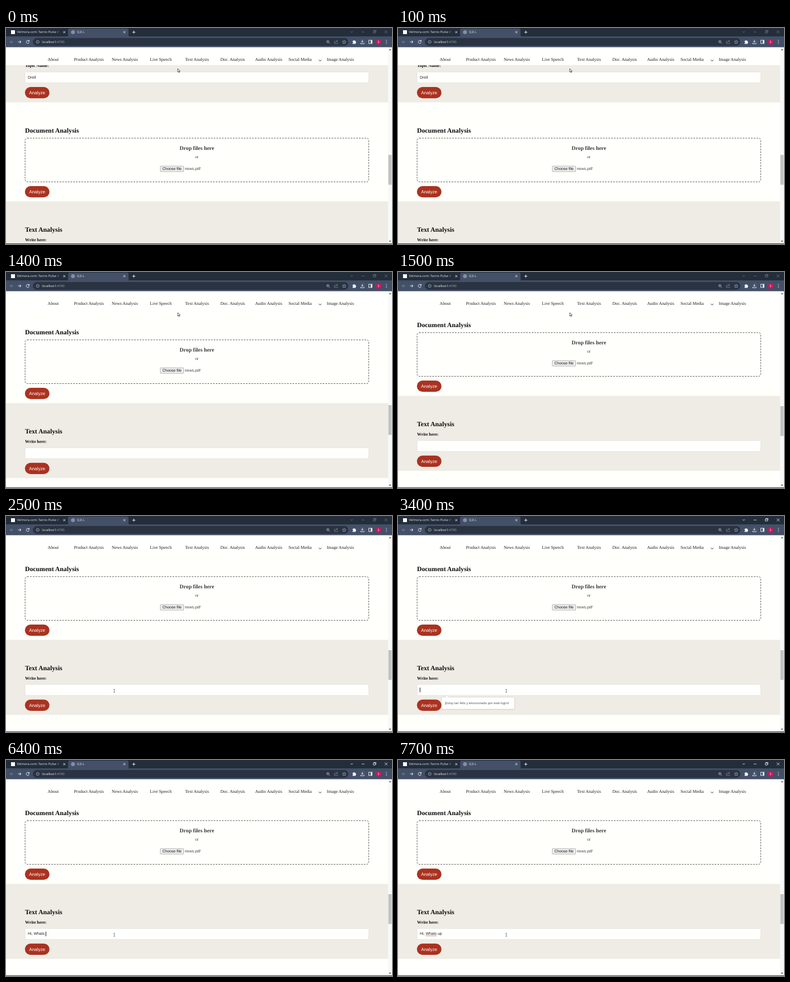
Animation, 690 px wide and 388 px high, one loop 8000 ms. Source, as an HTML page:

```html
<!DOCTYPE html>
<html lang="en">
<head>
<meta charset="utf-8">
<title>Text analysis demo</title>
<style>
  html, body { margin: 0; width: 100%; height: 100%; overflow: hidden; background: #fffffb; }
  svg { display: block; width: 690px; height: 388px; }
  text { white-space: pre; text-rendering: geometricPrecision; }
  .serif { font-family: "Liberation Serif", "Times New Roman", serif; }
  .sans { font-family: "Liberation Sans", Arial, sans-serif; }
  .ui { font-family: "Open Sans", sans-serif; }
  .line { fill: none; stroke: #e4e8ee; stroke-width: 1; }
  .thin { fill: none; stroke: #b4bcc8; stroke-width: .7; }
</style>
</head>
<body>
<svg viewBox="0 0 690 388" xmlns="http://www.w3.org/2000/svg">
  <defs>
    <clipPath id="view"><rect y="66.5" width="683" height="321"/></clipPath>
    <linearGradient id="tabFade" x1="0" x2="1">
      <stop offset="0" stop-color="#242d3a" stop-opacity="0"/>
      <stop offset="1" stop-color="#242d3a"/>
    </linearGradient>
    <filter id="shadow" x="-10%" y="-30%" width="120%" height="170%">
      <feDropShadow dx="0" dy=".5" stdDeviation="1.1" flood-opacity=".22"/>
    </filter>
  </defs>

  <rect width="690" height="388" fill="#fffffb"/>
  <g clip-path="url(#view)"><g id="page"></g></g>
  <g id="nav"><rect y="34" width="683" height="32.5" fill="#fffffd"/></g>
  <path d="M559.3 57.2l2.2 2.1 2.2-2.1" fill="none" stroke="#222" stroke-width="1"/>

  <g id="scrollbar">
    <rect x="683" y="34" width="7" height="354" fill="#f8f8f7"/>
    <path d="M684.5 40h4l-2-2.6zM684.5 382h4l-2 2.6z" fill="#555"/>
    <rect id="thumb" x="683.5" width="5.8" height="53.5" fill="#c1c1c0"/>
  </g>
  <rect y="387" width="690" height="1" fill="#34373c"/>

  <g id="browser">
    <rect width="690" height="16" fill="#242d3a"/>
    <rect y="15" width="690" height="19.5" fill="#435067"/>
    <path d="M108 15.5q3 0 3-3V4q0-3 3-3h102q3 0 3 3v8.5q0 3 3 3z" fill="#435067"/>
    <rect x="48" y="18" width="564" height="14" rx="7" fill="#2a3341"/>
    <rect x="9" y="4" width="7" height="7" fill="#fff"/>
    <circle cx="119.7" cy="7.5" r="3.5" fill="#8290a5"/>
    <text class="ui" x="19.5" y="9.4" font-size="5.75" fill="#e6e9ee">Velmora.com: Tarnix Pulse 4 Fit</text>
    <rect x="88" y="2" width="9" height="12" fill="url(#tabFade)"/>
    <rect x="97" y="2" width="11" height="12" fill="#242d3a"/>
    <text class="ui" x="127" y="9.4" font-size="5.6" fill="#f0f3f6">Q.E.L</text>
    <text class="ui" x="64.3" y="27.1" font-size="5.75" fill="#f1f3f5">localbox1<tspan fill="#a4adba">:4700</tspan></text>
    <path class="line" d="M102.4 5.7l3.6 3.6m0-3.6l-3.6 3.6M209.8 5.7l3.6 3.6m0-3.6l-3.6 3.6M225.7 7.5h5.6m-2.8-2.8v5.6"/>
    <path class="line" d="M13 25H7.5m2.6-2.6L7.5 25l2.6 2.6" style="stroke:#7b8799"/>
    <path class="line" d="M21.5 25H27m-2.6-2.6L27 25l-2.6 2.6"/>
    <path class="line" d="M41 23.3a2.7 2.7 0 1 0 .5 2.4M41.5 21.8v2.3h-2.3"/>
    <g class="thin">
      <circle cx="56.7" cy="25" r="2.6"/><path d="M56.7 24.5v2m0-3.2v.6"/>
      <circle cx="575.3" cy="24.5" r="2.2"/><path d="M577 26.2l2.2 2.2M574.2 24.5h2.2m-1.1-1.1v2.2"/>
      <path d="M588.5 23.5h-1.3v4.5h5.8v-1.5M589 26q.2-2.6 3.3-2.8m-1.3-1.6l1.9 1.6-1.9 1.7" stroke="#8a94a4"/>
      <path d="M604.5 21.9l.9 2.1 2.3.2-1.8 1.5.6 2.3-2-1.2-2 1.2.6-2.3-1.8-1.5 2.3-.2z"/>
    </g>
    <path class="line" d="M637 21.5v4.2m-2-1.9l2 2 2-2m-5.2 3v1.4h6.4v-1.4"/>
    <rect class="line" x="648.5" y="22" width="5.8" height="5.8"/>
    <path d="M619.5 23h1.6a1.1 1.1 0 0 1 2.2 0h1.7v1.7a1.1 1.1 0 0 1 0 2.2v1.6h-5.5v-1.8a1 1 0 0 0 0-2zM652 22h2.3v5.8H652z" fill="#eef1f5"/>
    <circle cx="666" cy="25" r="5" fill="#c9185b"/>
    <text class="ui" x="666" y="27" font-size="5.5" fill="#fff" text-anchor="middle">S</text>
    <path d="M680 22.2v.01m0 2.8v.01m0 2.8v.01" stroke="#eef1f5" stroke-width="1.4" stroke-linecap="round"/>
    <g id="controls" fill="none" stroke-width=".8">
      <path d="M615.8 6l2.2 2.1L620.2 6M635.8 7.2h5M677 4.5l5 5m0-5l-5 5"/>
      <path d="M656.5 5.5h3.6v3.6h-3.6zM657.7 5.3v-1h3.6v3.6h-1"/>
    </g>
  </g>

  <g id="popup">
    <path d="M80 326h4l3.5-3 3.5 3h115q2 0 2 2v16.5q0 2-2 2H80q-2 0-2-2V328q0-2 2-2z" fill="#fffffe" filter="url(#shadow)"/>
    <text class="ui" x="83.5" y="338.2" font-size="5.6" fill="#3c4047">¡Estoy tan feliz y emocionado por este logro!</text>
  </g>
  <path id="arrow" d="M0 0v6.2l1.4-1.3 1 2.2 1-.5-1-2.1h2z" fill="#fff" stroke="#222" stroke-width=".7"/>
  <path id="ibeam" d="M-1.4-2.7h2.8M0-2.7v5.4M-1.4 2.7h2.8" transform="translate(193.5 314)" fill="none" stroke="#444" stroke-width=".6"/>
</svg>

<script>
const LOOP = 8000, SCROLL_END = 89;
const $ = id => document.getElementById(id);

function add(parent, tag, attrs, content = '') {
  const node = document.createElementNS('http://www.w3.org/2000/svg', tag);
  for (const key in attrs) node.setAttribute(key, attrs[key]);
  node.textContent = content;
  parent.append(node);
  return node;
}

function label(parent, content, x, y, size, attrs = {}) {
  return add(parent, 'text', { class: 'serif', x, y, 'font-size': size, fill: '#0c0c0c', ...attrs }, content);
}

const page = $('page');
const bold = { 'font-weight': 'bold' };
const sans = { class: 'sans', fill: '#222' };

function band(y, height) {
  add(page, 'rect', { y, width: 683, height, fill: '#efebe5' });
}

function button(y) {
  add(page, 'rect', { x: 33.8, y, width: 43.9, height: 20.2, rx: 10.1, fill: '#aa3220' });
  label(page, 'Analyze', 55.6, y + 12.8, 8.15, { class: 'sans', fill: '#fff', 'text-anchor': 'middle' });
}

// A captioned input with its button; returns the input's text node.
function field(caption, y, value) {
  label(page, caption, 34, y - 8.6, 7.83, bold);
  add(page, 'rect', { x: 34, y, width: 614.5, height: 19.5, rx: 1, fill: '#fffffd', stroke: '#dcdad5', 'stroke-width': .6 });
  button(y + 27);
  return label(page, value, 39, y + 11.7, 6.95, sans);
}

band(0, 133.5);
field('Topic Name:', 79, 'Drell');

label(page, 'Document Analysis', 34, 187.8, 11.75, bold);
add(page, 'rect', { x: 34.1, y: 197.9, width: 614.3, height: 78.5, rx: 4, fill: 'none', stroke: '#555', 'stroke-width': .98, 'stroke-dasharray': '2.94 1.96' });
label(page, 'Drop files here', 341.2, 219.4, 9.85, { ...bold, fill: '#3c3c3c', 'text-anchor': 'middle' });
label(page, 'or', 341.2, 233.9, 7.83, { fill: '#444', 'text-anchor': 'middle' });
add(page, 'rect', { x: 275.9, y: 248.1, width: 41.6, height: 9.9, rx: 1, fill: '#efefef', stroke: '#868686', 'stroke-width': .6 });
label(page, 'Choose file', 279.4, 255.3, 6.9, { ...sans, fill: '#111' });
label(page, 'news.pdf', 319.6, 255.3, 7, { ...sans, fill: '#444' });
button(284.1);

band(311.5, 134.7);
label(page, 'Text Analysis', 34, 365.8, 11.75, bold);
const typed = field('Write here:', 391.7, '');
const squiggle = add(page, 'path', {
  d: 'M49.5 404.8' + 'q.6-1 1.2 0t1.2 0'.repeat(8),
  fill: 'none', stroke: '#e0302c', 'stroke-width': .7
});
const caret = add(page, 'rect', { y: 397.3, width: 1, height: 8.2, fill: '#111' });

[['About', 74.5], ['Product Analysis', 121.5], ['News Analysis', 189], ['Live Speech', 257.2],
 ['Text Analysis', 320], ['Doc. Analysis', 383.2], ['Audio Analysis', 445.2],
 ['Social Media', 505], ['Image Analysis', 573.5]]
  .forEach(([name, x]) => label($('nav'), name, x, 59, 7.83, { fill: '#1c1c1c' }));

// Value of the last [time, value] step reached.
function stepAt(steps, t) {
  return steps.reduce((value, [start, next]) => t >= start ? next : value, steps[0][1]);
}

const scrolling = [[0, 0], [1300, 45], [1400, 76], [1500, SCROLL_END]];
const typing = [[0, ''], [4300, 'H'], [4400, 'Hi'], [5300, 'Hi, W'], [5900, 'Hi, Wh'], [6000, 'Hi, Wha'],
  [6100, 'Hi, What'], [6200, 'Hi, Whats'], [6400, 'Hi, Whats '], [7100, 'Hi, Whats up']];
const popupFade = [[0, 0], [2800, 0], [2900, .35], [3000, .75], [3100, 1], [4300, .5], [4400, 0]];
const arrowSpots = [[0, [307, 73]], [2400, [232, 246]]];

function show(node, visible) {
  node.style.display = visible ? '' : 'none';
}

function render(t) {
  const scroll = stepAt(scrolling, t);
  page.setAttribute('transform', `translate(0 ${-scroll})`);
  $('thumb').setAttribute('y', 228 + 13 * scroll / SCROLL_END);

  $('controls').setAttribute('stroke', t < 2800 ? '#707987' : '#f2f4f6');
  $('arrow').setAttribute('transform', `translate(${stepAt(arrowSpots, t)})`);
  show($('arrow'), t < 2500);
  show($('ibeam'), t >= 2500);
  $('popup').setAttribute('opacity', stepAt(popupFade, t));

  typed.textContent = stepAt(typing, t);
  caret.setAttribute('x', 38.8 + typed.getComputedTextLength());
  show(caret, t >= 3400 && t < 7700);
  show(squiggle, t >= 7100);
}

const start = performance.now();
function tick() {
  render((performance.now() - start) % LOOP);
  requestAnimationFrame(tick);
}
tick();
</script>
</body>
</html>
```
